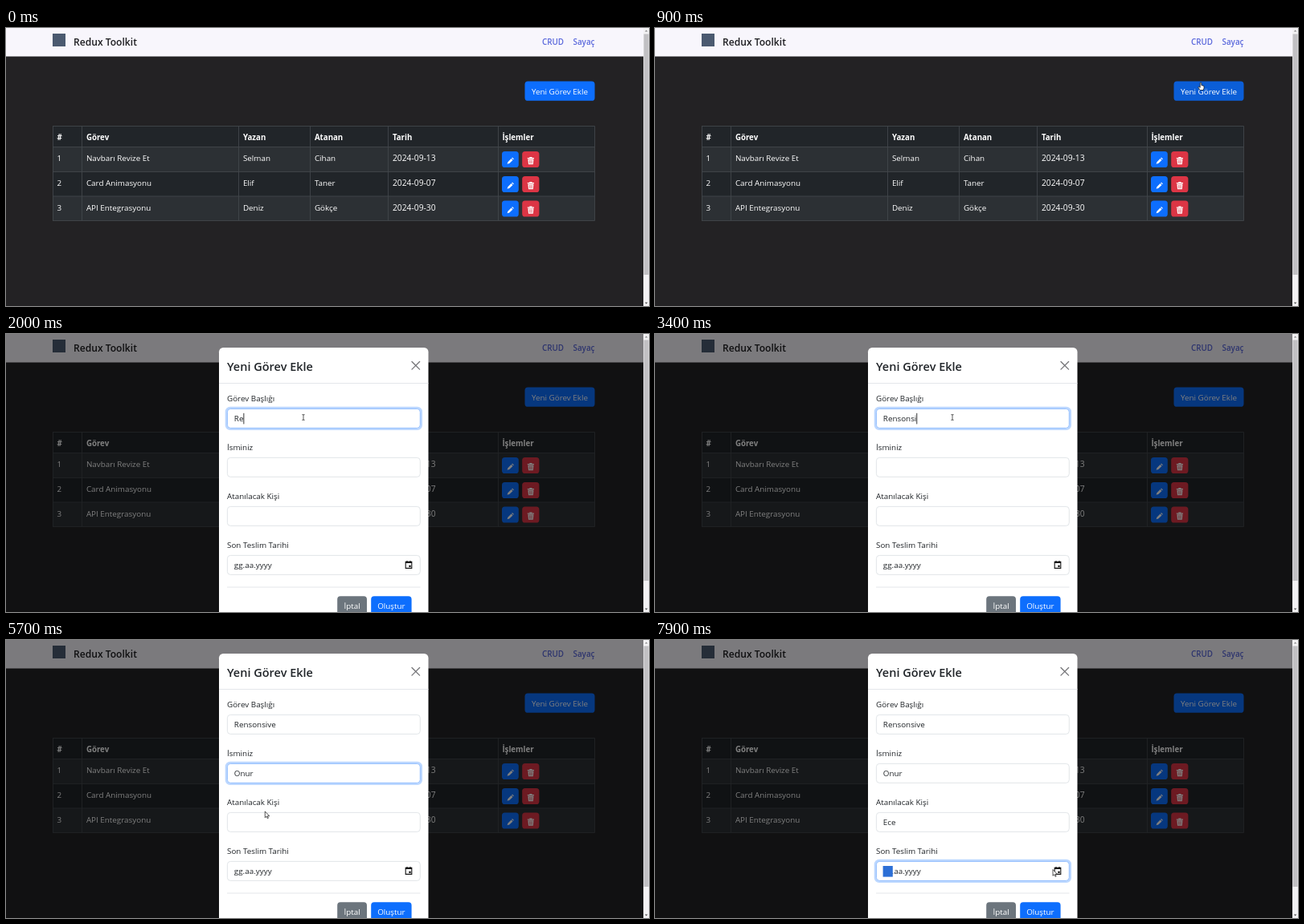
These frames come from a looping animation (800 px wide and 347 px high, 8000 ms). An HTML page:

```html
<!DOCTYPE html>
<html lang="tr">
<head>
<meta charset="utf-8">
<title>Redux Toolkit</title>
<style>
  html, body { margin: 0; width: 100%; height: 100%; overflow: hidden; background: #232224; }
  svg { display: block; width: 800px; height: 347px; font: 9.85px "Open Sans", "Noto Sans", sans-serif; }
  text { white-space: pre; }
  .bold { font-weight: 700; font-size: 9.7px; }
  .semi { font-weight: 600; }
  .date { font-size: 10.3px; }
</style>
</head>
<body>
<svg id="stage" viewBox="0 0 800 347"></svg>
<script>
const stage = document.getElementById('stage');
const LOOP = 8000, STEP = 100, OPEN = 1000;

function add(parent, tag, attrs = {}, content) {
  const el = document.createElementNS('http://www.w3.org/2000/svg', tag);
  for (const key in attrs) el.setAttribute(key, attrs[key]);
  if (content !== undefined) el.textContent = content;
  parent.append(el);
  return el;
}
const rect = (p, x, y, width, height, fill, rx = 0, more = {}) =>
  add(p, 'rect', { x, y, width, height, fill, rx, ...more });
const text = (p, x, y, str, fill = '#fff', cls = '', more = {}) =>
  add(p, 'text', { x, y, fill, class: cls, ...more }, str);
const path = (p, d, more) => add(p, 'path', { d, fill: 'none', ...more });
const show = (el, on) => el.setAttribute('visibility', on ? 'visible' : 'hidden');

// Page
const page = add(stage, 'g');
rect(page, 0, 0, 793, 347, '#232224');
rect(page, 0, 0, 793, 35.5, '#f8f6fc');
rect(page, 58, 7, 16, 16, '#4b5a70');
text(page, 84, 21.5, 'Redux Toolkit', '#1c1c1f', 'semi', { 'font-size': 12.1 });
text(page, 667, 20.8, 'CRUD', '#5a68dc', 'semi');
text(page, 705.5, 20.8, 'Sayaç', '#5a68dc', 'semi');
const addButton = rect(page, 645.5, 66.5, 87, 24.3, '#0d6efd', 3.9);
text(page, 689, 82.8, 'Yeni Görev Ekle', '#fff', '', { 'text-anchor': 'middle' });

// Table
const cols = [58, 94.5, 289.5, 378.5, 475.5, 612];
const lines = [122.5, 148.5, 179.5, 210, 240.5];
const rows = [
  ['#', 'Görev', 'Yazan', 'Atanan', 'Tarih', 'İşlemler'],
  ['1', 'Navbarı Revize Et', 'Selman', 'Cihan', '2024-09-13'],
  ['2', 'Card Animasyonu', 'Elif', 'Taner', '2024-09-07'],
  ['3', 'API Entegrasyonu', 'Deniz', 'Gökçe', '2024-09-30']
];
rows.forEach((cells, r) => {
  const y = lines[r];
  rect(page, 58, y, 674.5, lines[r + 1] - y, r % 2 ? '#2c3034' : '#212529');
  cells.forEach((cell, c) => text(page, cols[c] + 5.4, y + (r ? 17.8 : 17.1), cell, '#fff',
    r ? (c === 4 ? 'date' : '') : 'bold'));
  if (!r) return;
  rect(page, 617, y + 5.5, 20.8, 20, '#0d6efd', 3.6);
  rect(page, 642.2, y + 5.5, 21.2, 20, '#dc3545', 3.6);
  path(page, `M623.6 ${y + 21.3}l.8 -2.6 4.2 -4.2 1.9 1.9 -4.2 4.2zM629.2 ${y + 13.9}l.8 -.8 1.9 1.9 -.8 .8z`,
    { fill: '#fff' });
  path(page, `M648.8 ${y + 13.5}h8.2v1.2h-8.2zM651.3 ${y + 12.5}h3.2v1h-3.2zM649.4 ${y + 15.2}h7l-.6 6.6h-5.8z`,
    { fill: '#fff' });
  path(page, `M651.4 ${y + 16.3}v4.4m1.5 -4.4v4.4m1.5 -4.4v4.4`, { stroke: '#dc3545', 'stroke-width': .6 });
});
path(page, lines.map(y => `M58 ${y}H732.5`).join('') +
  [...cols.map(x => Math.floor(x) + .5), 732.5].map(x => `M${x} 122.5V240.5`).join(''),
  { stroke: '#42474b', 'stroke-width': .9 });

// Modal
const modal = add(stage, 'g');
rect(modal, 0, 0, 793, 347, '#000', 0, { opacity: .5 });
rect(modal, 265, 17, 260.5, 345, '#fff', 5.2);
text(modal, 275, 45.6, 'Yeni Görev Ekle', '#212529', 'semi', { 'font-size': 14.5 });
path(modal, 'M505 34.5l9.6 9.6m0 -9.6l-9.6 9.6', { stroke: '#77777a', 'stroke-width': 1.3, 'stroke-linecap': 'round' });
path(modal, 'M265 61.5H525.5M275 316H515.5', { stroke: '#e1e4e8', 'stroke-width': .9 });

const fields = ['Görev Başlığı', 'İsminiz', 'Atanılacak Kişi', 'Son Teslim Tarihi'].map((label, i) => {
  const y = 93.2 + i * 61;
  text(modal, 275, y - 8.8, label, '#212529');
  const glow = rect(modal, 274.1, y - 1.1, 242.5, 26.6, 'none', 4.8,
    { stroke: '#0d6efd', 'stroke-opacity': .27, 'stroke-width': 2.8 });
  const box = rect(modal, 275.4, y + .2, 239.9, 24, '#fff', 3.9, { 'stroke-width': .9 });
  return { y, glow, box, value: text(modal, 283.8, y + 16.2, '', '#212529') };
});
const dateY = fields[3].y;
const picked = rect(modal, 283.6, dateY + 5.8, 12.2, 13.6, '#2c6fd6');
const dayPart = add(fields[3].value, 'tspan', {}, 'gg');
add(fields[3].value, 'tspan', {}, '.aa.yyyy');
path(modal, `M497.2 ${dateY + 8}h7.6v8.2h-7.6zM497.2 ${dateY + 9.2}h7.6M499 ${dateY + 6.8}v1.4m4 -1.4v1.4`,
  { stroke: '#151515', 'stroke-width': 1.1 });
rect(modal, 501.4, dateY + 12.4, 2.2, 2.4, '#151515');
const caret = rect(modal, 0, 0, .9, 13.6, '#222');

rect(modal, 412.2, 327.2, 36.8, 24.4, '#6c757d', 3.9);
rect(modal, 454.2, 327.2, 50.4, 24.4, '#0d6efd', 3.9);
text(modal, 430.6, 343.4, 'İptal', '#fff', '', { 'text-anchor': 'middle' });
text(modal, 479.4, 343.4, 'Oluştur', '#fff', '', { 'text-anchor': 'middle' });

// Scrollbar
rect(stage, 793, 0, 7, 347, '#f3f2f4');
rect(stage, 793.5, 7.5, 6, 300.5, '#c1c0c3');
path(stage, 'M794.8 4.6l1.8 -2.2 1.8 2.2z', { fill: '#8a8a8c' });
path(stage, 'M794.8 342.4l1.8 2.2 1.8 -2.2z', { fill: '#505050' });

// Pointers, each drawn around its hot spot
const ink = { fill: '#fff', stroke: '#111', 'stroke-width': .7, 'stroke-linejoin': 'round' };
const pointers = {
  arrow: path(stage, 'M0 0V7.8L1.8 6.2 3 8.8 4.2 8.3 3 5.8H5.5Z', ink),
  hand: path(stage, 'M-.8 .5Q0 -.6 .8 .5V3.4L4 4.4V7.2L3 9.6H-.8L-3.2 6Q-2.8 4.9 -1.8 5.6L-.8 6.4Z', ink),
  beam: path(stage, 'M-1.6 -3.4H-.4Q0 -3.4 0 -2.8 0 -3.4 .4 -3.4H1.6M0 -3V3M-1.6 3.4H-.4Q0 3.4 0 2.8 0 3.4 .4 3.4H1.6',
    { stroke: '#333', 'stroke-width': .8 })
};

// [time, x, y]
const route = [
  [100, 632, 196], [800, 679, 68], [900, 679, 68], [1000, 674, 69], [1700, 370, 104], [4000, 370, 104],
  [4400, 343, 168], [5300, 343, 168], [5900, 315, 230], [6900, 315, 230], [7700, 495, 286.5]
];
// Focus time, final text and key times of each field
const script = [
  { at: 1800, word: 'Rensonsive', keys: [1900, 2000, 2200, 2500, 2600, 2700, 3000, 3200, 3600, 3800] },
  { at: 4500, word: 'Onur', keys: [4800, 4900, 5000, 5100] },
  { at: 6000, word: 'Ece', keys: [6300, 6500, 6700] },
  { at: 7800 }
];

function pointerAt(t) {
  const next = route.findIndex(p => p[0] > t);
  if (next < 0) return route.at(-1).slice(1);
  if (next === 0) return null;
  const [t0, x0, y0] = route[next - 1], [t1, x1, y1] = route[next];
  const u = (t - t0) / (t1 - t0), k = u * u * (3 - 2 * u);
  return [x0 + (x1 - x0) * k, y0 + (y1 - y0) * k];
}
const inside = (x, y, left, top, w, h) => x >= left && x <= left + w && y >= top && y <= top + h;

function render(t) {
  const open = t >= OPEN;
  modal.style.display = open ? '' : 'none';

  const pos = pointerAt(t);
  let kind = null;
  if (pos) {
    const overButton = inside(...pos, 645.5, 66.5, 87, 24.3);
    const overField = fields.slice(0, 3).some(f => inside(...pos, 275, f.y, 240, 24.5));
    kind = !open && overButton ? 'hand' : open && overField ? 'beam' : 'arrow';
    pointers[kind].setAttribute('transform', `translate(${pos})`);
  }
  for (const name in pointers) show(pointers[name], name === kind);
  addButton.setAttribute('fill', kind === 'hand' ? '#0b5ed7' : '#0d6efd');
  if (!open) return;

  const active = script.findLastIndex(s => t >= s.at);
  fields.forEach((f, i) => {
    show(f.glow, i === active);
    f.box.setAttribute('stroke', i === active ? '#86b7fe' : '#dee2e6');
    const { word, keys } = script[i];
    if (!word) return;
    const typed = word.slice(0, keys.filter(k => k <= t).length);
    const hint = i === 0 && !typed;
    f.value.textContent = hint ? 'ör:Navbarı Revize Et' : typed;
    f.value.setAttribute('fill', hint ? '#6c757d' : '#212529');
    if (i !== active) return;
    caret.setAttribute('x', 283.8 + (typed ? f.value.getComputedTextLength() : 0));
    caret.setAttribute('y', f.y + 5.6);
  });

  const onDate = active === 3;
  show(picked, onDate);
  dayPart.setAttribute('fill', onDate ? '#fff' : '#212529');
  const typing = active >= 0 && !onDate;
  const last = typing ? Math.max(script[active].at, ...script[active].keys.filter(k => k <= t)) : 0;
  show(caret, typing && (t - last) % 1000 < 500);
}

function tick() {
  render(Math.floor(performance.now() % LOOP / STEP) * STEP);
  requestAnimationFrame(tick);
}
tick();
</script>
</body>
</html>
```
